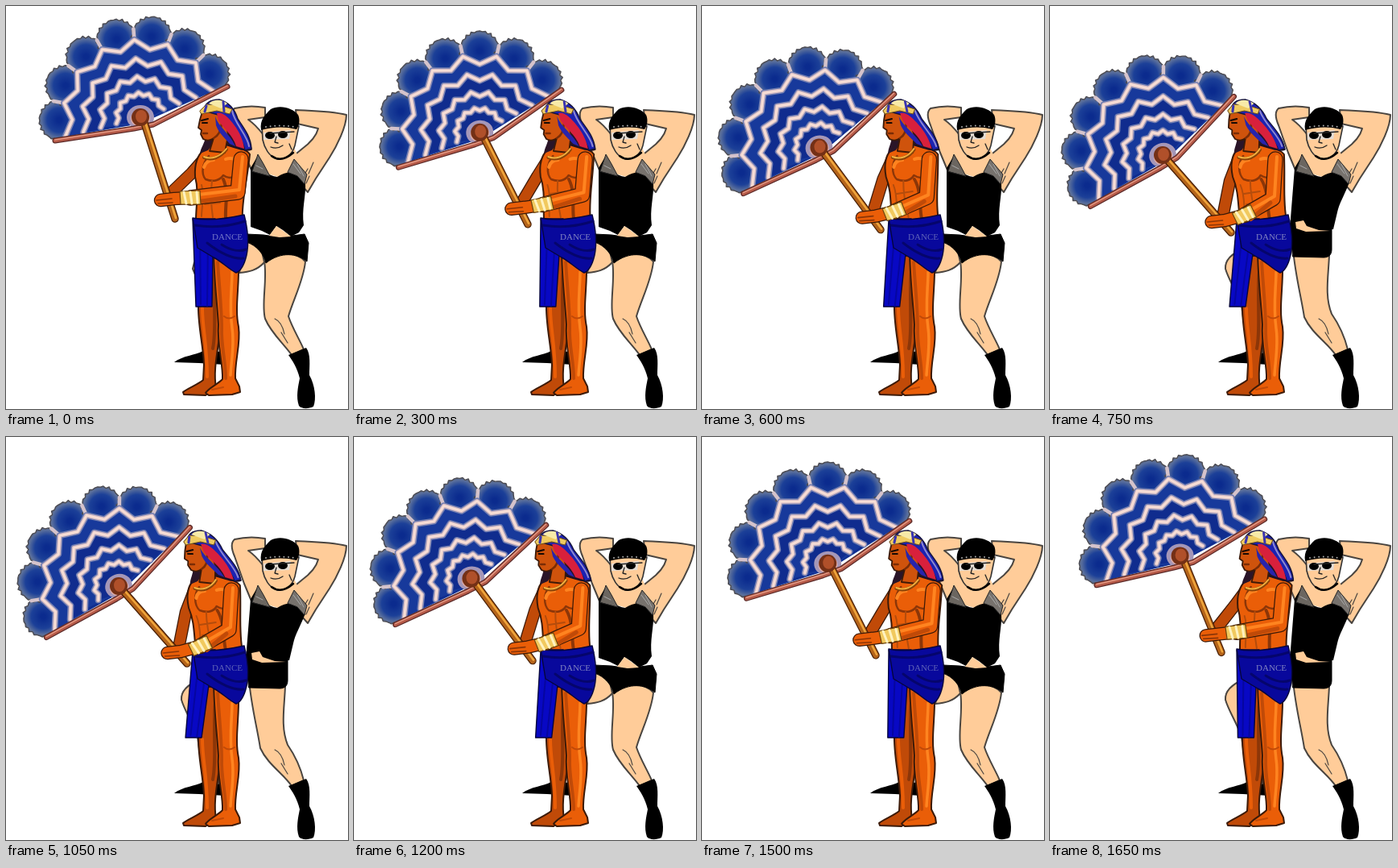
An HTML page with a canvas that plays this animation: 425x500 px, repeating every 1800 ms.

```html
<!DOCTYPE html>
<html lang="en">
<head>
<meta charset="utf-8">
<title>Fan bearer and dancer</title>
<style>
html, body { margin: 0; width: 100%; height: 100%; overflow: hidden; background: #fff; }
canvas { display: block; width: 425px; height: 500px; }
</style>
</head>
<body>
<canvas id="stage" width="425" height="500"></canvas>
<script>
const ctx = document.getElementById('stage').getContext('2d');
const STEP = 150, STEPS = 12, RAD = Math.PI / 180;
const SKIN = '#ffcc99', INK = '#000', SOFT = '#4a4540';
const BRONZE = '#ea5e08', DIM = '#c04a08', SHADE = '#8c3608', GLOW = '#ff8420', EDGE = '#3c1a08';
ctx.lineJoin = ctx.lineCap = 'round';

function shape(d, fill, stroke, width = 1.6) {
  const p = new Path2D(d);
  if (fill) { ctx.fillStyle = fill; ctx.fill(p); }
  if (stroke) { ctx.strokeStyle = stroke; ctx.lineWidth = width; ctx.stroke(p); }
}

function line(pts, width, color) {
  ctx.beginPath();
  pts.forEach(([x, y]) => ctx.lineTo(x, y));
  ctx.strokeStyle = color;
  ctx.lineWidth = width;
  ctx.stroke();
}

function limb(pts, width, color, edge) {
  line(pts, width + 2.5, edge);
  line(pts, width, color);
}

function dot(x, y, rx, ry, color) {
  ctx.beginPath();
  ctx.ellipse(x, y, rx, ry, 0, 0, 7);
  ctx.fillStyle = color;
  ctx.fill();
}

// Horizontal lean that leaves the line y = base in place.
function lean(slope, base, draw) {
  ctx.save();
  ctx.transform(1, 0, slope, 1, -slope * base, 0);
  draw();
  ctx.restore();
}

/* ---- dancer ---- */

const HIPS = [
  {
    knee: 'M298 288L316 296L321 318C312 328 302 330 290 331Z M234 318L232 326L235 333',
    leg: 'M321 317C340 302 362 306 372 317C370 340 357 364 351 385C356 400 364 412 370 426L355 433C344 418 329 405 322 388C317 370 325 340 321 317Z',
    shorts: 'M299 283L320 284L340 287L371 283L376 294L374 317C362 307 342 304 323 319C321 309 312 297 299 293Z',
    vest: 'M372 219C373 236 367 252 370 272L364 281L354 286L344 278L336 273L328 284L318 279L304 274',
    belly: 'M327 285L336 273L346 280L354 286L340 287Z'
  },
  {
    knee: 'M242 300C228 306 217 315 218 326C222 340 231 352 238 372L246 430L264 430L264 300Z',
    leg: 'M302 302C320 308 335 312 347 309C346 335 341 360 350 382C359 395 366 410 370 426L355 433C345 418 325 406 316 386C312 360 305 335 302 302Z',
    shorts: 'M298 274L316 276L350 277L350 302C350 308 347 312 340 312L302 311Z',
    vest: 'M372 219C366 234 359 246 357 256L352 277L330 278L298 276',
    belly: 'M305 268L315 266L319 273L334 278L348 279L318 280L306 276Z'
  }
];

function drawDancer(hip) {
  shape('M209 442C219 434 236 433 245 428L272 429L272 445L240 443Z', INK);
  shape(hip.knee, SKIN, SOFT, 2);
  shape(hip.leg, SKIN, SOFT, 2);
  shape('M334 388Q343 392 346 407M342 405L350 418', null, SOFT, 1.2);
  shape('M351 433L373 424C379 432 377 446 377 458C384 470 386 488 382 497C376 500 367 500 364 496C360 485 363 472 365 462C362 449 356 440 351 433Z', INK);

  shape('M322 126C306 123 292 125 284 127C278 132 281 141 284 148L296 182L306 206L328 186L320 160C313 151 307 145 301 141L322 138Z', SKIN, SOFT, 2);
  shape('M360 129C378 130 402 130 423 135C423 150 411 174 402 188L385 214L375 231L360 214L350 192L367 178C378 170 386 160 388 152L362 146Z', SKIN, SOFT, 2);
  shape('M318 178L358 176L374 209L352 216L318 206Z', SKIN);
  shape('M382 194L376 208M375 202L368 214M377 211L373 220', null, SOFT, 1.2);
  shape(hip.shorts, INK, INK, 1);
  shape('M304 201L311 189C316 202 326 211 337 212C347 206 356 205 363 209L' + hip.vest.slice(1) + 'Z', INK);
  shape(hip.belly, SKIN);
  shape('M306 205L313 184L320 196L328 211Z', '#6b6660', '#222', 1);
  shape('M350 206L358 190L374 209L371 221L362 211Z', '#77726d', '#222', 1);
  shape('M311 198L319 202M357 196L366 208M362 196L370 211', null, '#aaa', 1);

  shape('M318 148L319 166C321 176 327 187 337 190C348 191 356 184 359 173L364 149Z', SKIN, '#333', 1.6);
  shape('M330 186Q342 195 357 182', null, INK, 2.5);
  shape('M317 154C315 141 322 135 329 128C340 122 356 126 363 135C366 142 364 149 361 153C346 149 331 150 317 154Z', INK);
  for (let i = 0; i < 7; i++) dot(323 + i * 5.6, 150 - Math.sin(i / 2) * 1.5, 1, 1, '#aaa');
  shape('M320 157L354 154L352 165L320 166Z', '#e4dcd4');
  dot(328, 160.5, 6, 4.5, INK);
  dot(344, 159.5, 6, 4.5, INK);
  shape('M328 158L358 156M336 162L334 169L338 170M329 175Q337 178 344 173M352 171L355 178', null, '#222', 1.3);
}

/* ---- fan ---- */

const FIRST = 194.5, FEATHERS = 7, ARC = 25;

function polar(deg, r) {
  return [Math.cos(deg * RAD) * r, -Math.sin(deg * RAD) * r];
}

function plume(deg) {
  const [x, y] = polar(deg, 101);
  const g = ctx.createRadialGradient(x, y, 3, x, y, 27);
  g.addColorStop(0, '#0b2b8e');
  g.addColorStop(.5, '#1c4098');
  g.addColorStop(.8, '#5a6f9c');
  g.addColorStop(1, '#565a64');
  ctx.beginPath();
  for (let i = 0; i < 44; i++) {
    const [dx, dy] = polar(deg + i * 360 / 44, 24.5 + 1.5 * Math.sin(i * 2.7 + deg));
    ctx.lineTo(x + dx, y + dy);
  }
  ctx.closePath();
  ctx.fillStyle = g;
  ctx.fill();
  ctx.strokeStyle = '#4b4a50';
  ctx.lineWidth = 1.3;
  ctx.stroke();
}

// Zigzag band whose peaks lie between neighbouring plumes.
function tier(r, fill) {
  const pts = [];
  for (let i = 0; i <= FEATHERS * 2; i++)
    pts.push(polar(FIRST - i * ARC / 2, r * (i % 2 ? .93 : 1.06)));
  ctx.beginPath();
  ctx.moveTo(0, 8);
  pts.forEach(p => ctx.lineTo(...p));
  ctx.closePath();
  ctx.fillStyle = fill;
  ctx.fill();
  line(pts, 8, '#6f7cb0');
  line(pts, 5, '#d9bfc6');
  line(pts, 2.5, '#f8dfd6');
}

function drawFan(k, hub) {
  ctx.save();
  ctx.translate(...hub);
  ctx.rotate(-4 * k * RAD);
  for (let i = 0; i < FEATHERS; i++) plume(FIRST - (i + .5) * ARC);
  for (let i = 1; i < FEATHERS; i++)
    line([polar(FIRST - i * ARC, 90), polar(FIRST - i * ARC, 110)], 4.5, '#d5c3cb');
  [91, 69, 48, 29].forEach((r, i) => tier(r, i % 2 ? '#102c8e' : '#17399b'));
  dot(0, 0, 17, 15, '#a597b8');
  dot(0, 2, 12, 10, '#dfaaa4');
  const rod = [[-106, 29], [-8, 14], [16, 9], [108, -38]];
  limb(rod, 4.5, '#b65a48', '#5b2a28');
  line(rod.map(([x, y]) => [x, y - 1]), 1.4, '#e39a84');
  ctx.restore();
}

/* ---- fan bearer ---- */

function drawLegs() {
  shape('M239 368C238 395 245 420 246 445L245 464C238 470 226 474 220 479L221 482L248 483L261 474C257 450 264 425 266 402L266 310L242 310Z', DIM, EDGE, 2);
  shape('M244 375C244 400 250 420 250 460', null, BRONZE, 4);
  shape('M260 330C257 370 262 400 257 425', null, SHADE, 4);
  shape('M258 300C258 335 262 365 264 395C262 420 270 445 269 463C262 470 252 474 248 480L252 483L281 482L291 479L290 472L285 462C284 440 292 420 289 398C284 375 290 350 289 318Z', BRONZE, EDGE, 2);
  shape('M263 318C265 350 268 375 268 400C267 420 273 440 273 462', null, DIM, 4);
  shape('M281 330C281 350 277 370 281 400C284 420 280 440 279 458', null, GLOW, 3.5);
  shape('M271 385Q277 390 284 385M256 476L270 473', null, DIM, 2);
}

function drawTorso() {
  shape('M246 178C238 185 234 197 235 212C240 230 236 248 236 266L294 266C292 245 300 215 303 184C298 176 282 174 270 168L254 166Z', BRONZE, EDGE, 2);
  shape('M252 186C244 195 242 208 248 215C258 219 266 216 270 210C278 216 287 212 290 203', null, SHADE, 2.5);
  shape('M256 217C254 232 255 248 257 262M243 222C247 235 243 250 243 261M246 233L266 230M247 246L266 244', null, '#b44c0c', 2);
  shape('M273 190C281 187 291 191 291 200M246 200C248 194 252 191 258 191', null, GLOW, 4);
  shape('M270 215C277 230 272 250 273 262', null, SHADE, 4);
}

function drawHead() {
  shape('M270 132C284 145 303 164 305 178C298 181 286 176 276 173L258 170Z', '#241326', '#1b1020', 1.5);
  shape('M249 160C247 170 242 176 241 183L251 179L262 166Z', '#2a1528');
  shape('M244 131L241 141L239 151L243 154L242 159L245 165C250 168 256 166 258 164L253 180L272 182L276 160L272 132Z', '#cf530c', EDGE, 1.8);
  shape('M258 164C264 161 267 155 268 146M245 158L250 158', null, '#7a2c06', 2.5);
  shape('M243 142L251 140M244 145L250 145', null, '#180a04', 2);
  shape('M246 130C246 121 254 116 265 116C279 120 285 130 288 140C296 152 304 162 305 177L297 179C293 161 276 148 267 136Z', '#1c22b2', '#15143c', 1.5);
  shape('M262 133C270 131 278 140 283 147C291 157 295 168 296 177L286 174C282 160 270 152 264 142Z', '#d8203c');
  shape('M260 137C264 150 279 159 285 174L278 171C272 164 264 157 261 148Z', '#2824ac');
  shape('M281 130C284 146 300 160 302 174', null, '#8f8ad0', 2);
  shape('M241 130L249 122L266 123L281 128L278 134L262 130L243 134Z', '#efcb61', '#705019', 1);
  shape('M252 121C258 115 269 116 275 121L267 127Z', '#f7eaa8');
  shape('M249 124L247 131M270 119L271 131', null, '#3a34b0', 3);
  shape('M246 188C255 192 266 188 274 178', null, '#8a4408', 4);
  shape('M246 187C255 191 266 187 274 177', null, '#f0b040', 2);
}

function drawSkirt(k, step) {
  lean(-.024 * k, 265, () => {
    shape('M232 264L260 264L257 312L256 373L236 373Z', '#0808c4', '#05053c', 1.4);
    shape('M241 280L242 370M251 290L250 372', null, '#0606a0', 2);
  });
  shape('M232 263C250 267 278 263 296 259C300 275 302 295 299 309C296 322 291 329 286 331C276 326 268 317 258 312L238 300Z', '#08089c', '#05053c', 1.4);
  shape('M235 272C260 276 282 272 297 267M250 294C268 308 284 314 295 313M268 296C280 304 291 305 298 302', null, '#05056c', 3);
  ctx.font = '11px "Liberation Serif", serif';
  ctx.textAlign = 'center';
  ctx.fillStyle = ['#7477c8', '#6064b8', '#8385c2'][step % 3];
  ctx.fillText('DANCE', 275, 290);
}

function drawHandle(k, hub) {
  const rod = [[hub[0] + 4, hub[1] + 4], [210 + 3 * k, 264 + 3.4 * k]];
  limb(rod, 7, '#b5641a', '#4a2006');
  line(rod.map(([x, y]) => [x + 1, y - 1]), 2.5, '#f0a63c');
  dot(...hub, 11, 11, '#743016');
  dot(hub[0] + 1, hub[1] - 1, 7, 8, '#b0502a');
}

function drawNearArm(k, hand) {
  const elbow = [288 - 2.2 * k, 231 + 1.6 * k];
  const wrist = [229 + 2.5 * k, 238 + 4.3 * k];
  const arm = [[292 - 2.4 * k, 190], elbow, wrist];
  limb(arm, 17, BRONZE, EDGE);
  line(arm.map(([x, y]) => [x + 2, y - 3]), 4, GLOW);
  line([[elbow[0] - 3, elbow[1] + 5], [wrist[0] + 8, wrist[1] + 5]], 5, DIM);
  limb([[hand[0] - 8, hand[1] + 2], [hand[0] + 9, hand[1]], wrist], 14, BRONZE, EDGE);
  shape(`M${hand[0] - 13} ${hand[1] + 2}l19 -2m-17 6l18 -1`, null, SHADE, 1.6);
  ctx.save();
  ctx.translate(...wrist);
  ctx.rotate(-4.5 * k * RAD);
  shape('M-13 -8L12 -9L13 8L-12 8Z', '#f1c95e', '#6c430d', 1.2);
  shape('M-8 -7L-5 7M0 -7L2 7M8 -7L9 6', null, '#fff2c0', 3);
  ctx.restore();
}

function drawBearer(k, step) {
  const hub = [167 - 5.4 * k, 138 + 9.4 * k];
  const hand = [200 + 1.7 * k, 239 + 5.4 * k];
  drawFan(k, hub);
  limb([[246 - 2.4 * k, 190], [231 - 1.5 * k, 207 + 2 * k], [hand[0] + 7, hand[1] - 9]], 13, DIM, EDGE);
  drawLegs();
  lean(.03 * k, 265, () => { drawTorso(); drawHead(); });
  drawSkirt(k, step);
  drawHandle(k, hub);
  drawNearArm(k, hand);
}

/* ---- loop ---- */

let shown = -1;
function tick(now) {
  const step = Math.floor(now / STEP) % STEPS;
  if (step !== shown) {
    shown = step;
    ctx.fillStyle = '#fff';
    ctx.fillRect(0, 0, 425, 500);
    drawDancer(HIPS[step % 2]);
    drawBearer(Math.min(step, STEPS - step), step);
  }
  requestAnimationFrame(tick);
}
tick(0);
</script>
</body>
</html>
```
